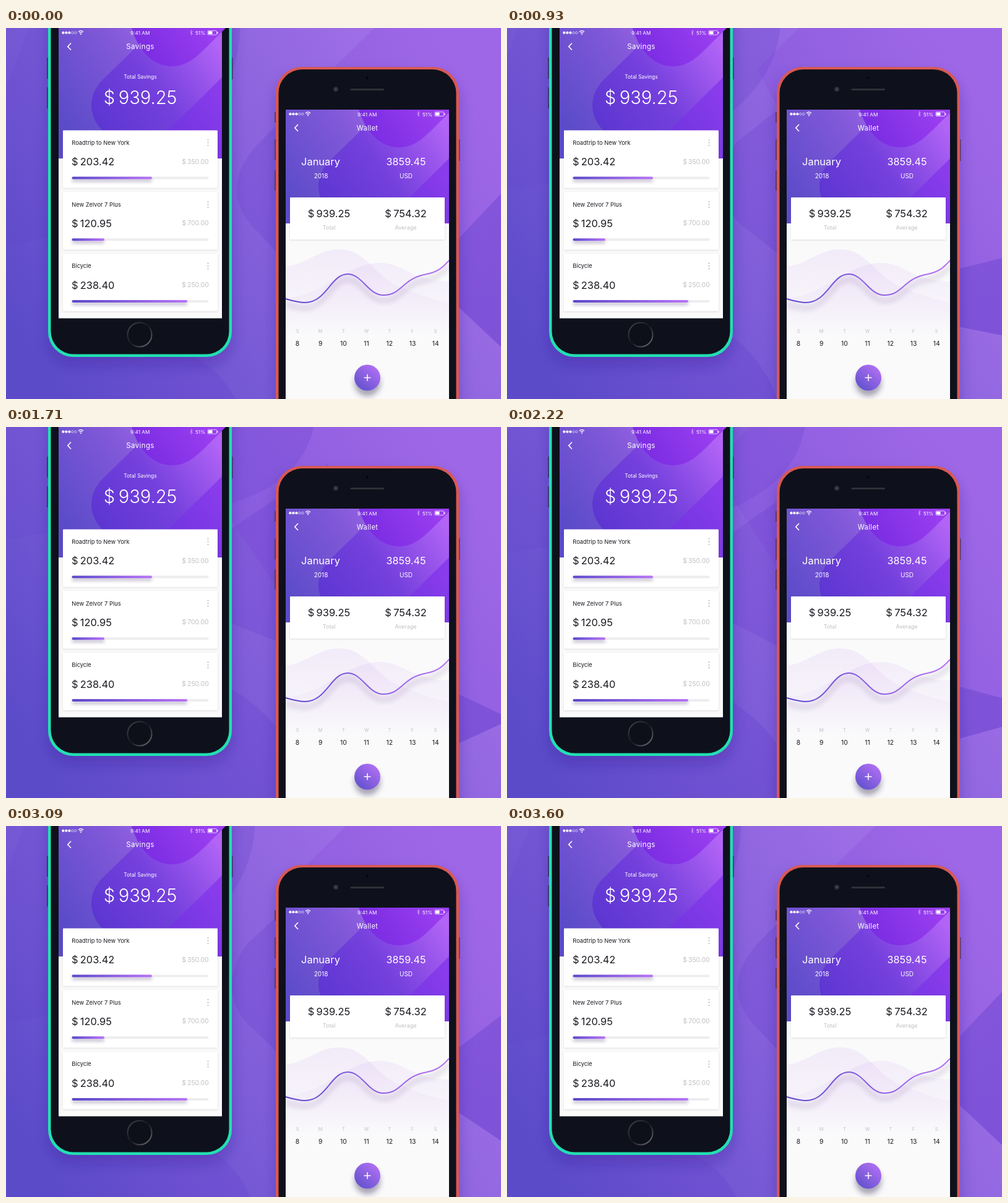
Recreate the animation shown at these times as an HTML page. Size 800 px wide and 600 px high, loop 3.63 s.

```html
<!DOCTYPE html>
<html lang="en">
<head>
<meta charset="utf-8">
<title>Savings and wallet</title>
<style>
  html, body { margin: 0; width: 100%; height: 100%; overflow: hidden; }
  svg { display: block; width: 800px; height: 600px; }
  text { font-family: Inter, sans-serif; }
  .money { word-spacing: -.08em; }
</style>
</head>
<body>
<svg viewBox="0 0 800 600">
  <defs>
    <linearGradient id="sky" gradientUnits="userSpaceOnUse" x1="60" y1="560" x2="760" y2="120">
      <stop stop-color="#5b4bc9"/><stop offset=".5" stop-color="#8560db"/><stop offset="1" stop-color="#a672e9"/>
    </linearGradient>
    <linearGradient id="soft" gradientUnits="userSpaceOnUse" x1="0" y1="0" x2="500" y2="0">
      <stop stop-color="#5638c4" stop-opacity=".1"/><stop offset="1" stop-color="#5638c4" stop-opacity=".22"/>
    </linearGradient>
    <linearGradient id="shade" gradientUnits="userSpaceOnUse" x1="0" y1="0" x2="800" y2="0">
      <stop stop-color="#5a3ac8" stop-opacity="0"/><stop offset="1" stop-color="#5a30c8" stop-opacity=".42"/>
    </linearGradient>
    <linearGradient id="head" gradientUnits="userSpaceOnUse" x1="95" y1="165" x2="330" y2="0">
      <stop stop-color="#5a4bc8"/><stop offset=".5" stop-color="#8058d8"/><stop offset="1" stop-color="#bb74f6"/>
    </linearGradient>
    <linearGradient id="blob" gradientUnits="userSpaceOnUse" x1="150" y1="175" x2="345" y2="30">
      <stop stop-color="#5a35d0"/><stop offset=".5" stop-color="#7540dd"/><stop offset="1" stop-color="#b264f6"/>
    </linearGradient>
    <linearGradient id="fold" gradientUnits="userSpaceOnUse" x1="216" y1="211" x2="349" y2="110">
      <stop stop-color="#6230d8"/><stop offset="1" stop-color="#8a3cec"/>
    </linearGradient>
    <linearGradient id="drop" gradientUnits="userSpaceOnUse" x1="230" y1="60" x2="325" y2="0">
      <stop stop-color="#7a2ce2"/><stop offset="1" stop-color="#9a3ef0"/>
    </linearGradient>
    <linearGradient id="bar"><stop stop-color="#5b48cb"/><stop offset="1" stop-color="#b873f6"/></linearGradient>
    <linearGradient id="fab" x1="0.1" y1="1" x2=".9" y2="0">
      <stop stop-color="#5b4fca"/><stop offset="1" stop-color="#b972f7"/>
    </linearGradient>
    <linearGradient id="wave" gradientUnits="userSpaceOnUse" x1="0" y1="358" x2="0" y2="500">
      <stop stop-color="#b57ae8" stop-opacity=".12"/><stop offset="1" stop-color="#b57ae8" stop-opacity="0"/>
    </linearGradient>
    <linearGradient id="ring" x1="0" y1="0" x2="1" y2="1">
      <stop stop-color="#4a4c54"/><stop offset=".5" stop-color="#15171f"/><stop offset="1" stop-color="#77787d"/>
    </linearGradient>
    <filter id="phoneShadow" x="-20%" y="-20%" width="140%" height="140%">
      <feDropShadow dx="0" dy="13" stdDeviation="12" flood-color="#2a1878" flood-opacity=".24"/>
    </filter>
    <filter id="cardShadow" x="-10%" y="-20%" width="120%" height="150%">
      <feDropShadow dx="0" dy="1" stdDeviation="1.6" flood-color="#223" flood-opacity=".14"/>
    </filter>
    <filter id="glow" filterUnits="userSpaceOnUse" x="80" y="220" width="660" height="380">
      <feDropShadow dx="0" dy="4" stdDeviation="2.5" flood-color="#3a2a60" flood-opacity=".35"/>
    </filter>
    <filter id="deepGlow" filterUnits="userSpaceOnUse" x="430" y="340" width="320" height="260">
      <feDropShadow dx="0" dy="9" stdDeviation="4" flood-color="#302848" flood-opacity=".4"/>
    </filter>
    <clipPath id="headClip"><path d="M85 1H349V185H85z"/></clipPath>
    <clipPath id="chartClip"><path d="M452 316H716V600H452z"/></clipPath>

    <g id="header">
      <path d="M85 0H349V211H85z" fill="url(#head)"/>
      <path d="M242 0L156 84C132 108 132 142 156 166L201 211H349V0z" fill="url(#blob)"/>
      <path d="M349 80L216 211H349z" fill="url(#fold)"/>
      <path d="M203 0C215 40 240 62 268 62C295 62 310 45 335 20L355 0z" fill="url(#drop)"/>
    </g>
    <g id="status" fill="#fff">
      <g id="dots"></g>
      <g fill="none" stroke="#fff">
        <path d="M117 6.2Q121 2.6 125 6.2M118.7 8.1Q121 6 123.3 8.1" stroke-width="1.2"/>
        <path d="M297.5 5.5L301.5 9.5L299.5 11.5V3.5L301.5 5.5L297.5 9.5" stroke-width=".6" opacity=".7"/>
        <rect x="326" y="4.3" width="14.5" height="6.8" rx="1.3" stroke-width=".7"/>
        <path d="M105 24.5L99.8 30L105 35.5" stroke-width="1.6"/>
      </g>
      <circle cx="121" cy="10" r="1"/>
      <path d="M327 5.3H333.5V10.1H327zM341.3 6.2H342.5V9.2H341.3z"/>
      <text x="216.7" y="11" font-size="8.2" text-anchor="middle">9:41 AM</text>
      <text x="306" y="11" font-size="8.2">51%</text>
    </g>
  </defs>

  <path d="M0 0H800V600H0z" fill="url(#sky)"/>
  <path class="drift" fill="url(#soft)"/>
  <path class="drift" fill="#7c3fdc" fill-opacity=".2"/>
  <path class="drift" fill="url(#shade)"/>
  <path class="drift" fill="url(#shade)"/>

  <g id="savings">
    <path d="M66 48h3v34h-3zM66 96h3v34h-3zM364 48h2.500v35h-2.500z" fill="#4a3a70"/>
    <rect x="68" y="-60" width="297" height="592" rx="41" fill="#20dfb2" filter="url(#phoneShadow)"/>
    <rect x="72.500" y="-60" width="288" height="587.500" rx="37" fill="#0e111b"/>
    <circle cx="216" cy="496" r="19.5" fill="#0d1019" stroke="url(#ring)" stroke-width="2"/>
    <path d="M85 0H349V469.500H85z" fill="#fafafb"/>
    <use href="#header"/><use href="#status"/>
  </g>

  <g id="wallet">
    <path d="M434 136h3v17h-3zM434 180h3v34h-3zM434 230h3v33h-3zM731 180h2.500v35h-2.500z" fill="#6a3f68"/>
    <rect x="436" y="63" width="296" height="620" rx="42" fill="#d85852" filter="url(#phoneShadow)"/>
    <rect x="440.5" y="67" width="287" height="620" rx="38" fill="#0e111b"/>
    <circle cx="533" cy="99" r="4" fill="#2c2e37"/><circle cx="533" cy="99" r="1.8" fill="#454852"/>
    <circle cx="584" cy="81" r="2.2" fill="#060810"/>
    <path d="M558 99.5H609.500" stroke="#2f3139" stroke-width="3" stroke-linecap="round"/>
    <path d="M452 132H716V600H452z" fill="#fafafb"/>
    <g transform="translate(367 131)" clip-path="url(#headClip)"><use href="#header"/></g>
    <use href="#status" x="367" y="131.5"/>
    <g clip-path="url(#chartClip)">
      <path d="M452 386C485 382 505 358 538 358C585 358 595 404 640 420C670 432 690 440 716 444V500H452z" fill="url(#wave)"/>
      <path d="M452 436C510 436 550 380 604 380C645 380 650 408 716 410V500H452z" fill="url(#wave)"/>
      <path d="M452 438C463 441 472 444 483 444C518 444 525 398 552 398C576 398 585 432 610 432C640 432 640 405 680 398C699 394 706 387 716 376"
        fill="none" stroke="url(#bar)" stroke-width="2" filter="url(#deepGlow)"/>
    </g>
    <rect x="459" y="274" width="250" height="68" rx="1" fill="#fff" filter="url(#cardShadow)"/>
    <circle cx="584" cy="565.500" r="21" fill="url(#fab)" filter="url(#deepGlow)"/>
    <path d="M578.500 565.500H589.500M584 560V571" stroke="#fff" stroke-width="1.5"/>
  </g>
</svg>
<script>
const savings = document.getElementById('savings');
const wallet = document.getElementById('wallet');
const add = (parent, markup) => parent.insertAdjacentHTML('beforeend', markup);

function label(parent, x, y, size, text, fill = '#fff', anchor = 'middle', extra = '') {
  const kind = text[0] === '$' ? 'class="money"' : '';
  add(parent, `<text x="${x}" y="${y}" font-size="${size}" fill="${fill}" text-anchor="${anchor}" ${kind} ${extra}>${text}</text>`);
}

const dots = document.getElementById('dots');
for (let i = 0; i < 5; i++) {
  const look = i < 3 ? 'r="2.1"' : 'r="1.8" fill="none" stroke="#fff" stroke-width=".6"';
  add(dots, `<circle cx="${92.4 + i * 5}" cy="7.700" ${look}/>`);
}

const ink = '#1b1b22', pale = '#c0c0c5';

label(savings, 217, 34, 11.5, 'Savings', '#fff', 'middle', 'letter-spacing=".4"');
label(savings, 217, 82, 8.5, 'Total Savings');
label(savings, 217, 123, 29.2, '$ 939.25', '#fff', 'middle', 'font-weight="300" letter-spacing="-.1"');

const goals = [
  ['Roadtrip to New York', '$ 203.42', '$ 350.00', 236],
  ['New Zelvor 7 Plus', '$ 120.95', '$ 700.00', 159],
  ['Bicycle', '$ 238.40', '$ 250.00', 293],
];
goals.forEach(([name, saved, goal, end], i) => {
  const y = 165.5 + i * 99.8;
  add(savings, `<rect x="92" y="${y}" width="250" height="93" rx="1" fill="#fff" filter="url(#cardShadow)"/>`);
  for (let d = 0; d < 3; d++) {
    add(savings, `<circle cx="326.500" cy="${y + 15.5 + d * 4.5}" r="1.1" fill="#bcbcc2"/>`);
  }
  add(savings, `<rect x="106.500" y="${y + 75}" width="221" height="4" rx="2" fill="#ededf0"/>
    <rect x="106.500" y="${y + 75}" width="${end - 106.5}" height="4" rx="2" fill="url(#bar)" filter="url(#glow)"/>`);
  label(savings, 106.3, y + 23.2, 9.3, name, ink, 'start');
  label(savings, 106, y + 56.8, 16.4, saved, ink, 'start');
  label(savings, 327.7, y + 54, 10.4, goal, pale, 'end');
});

label(wallet, 584, 165.5, 11.2, 'Wallet', '#fff', 'middle', 'letter-spacing=".4"');
label(wallet, 508.5, 221.5, 16.4, 'January');
label(wallet, 646.5, 221.5, 16.2, '3859.45');
label(wallet, 509, 243, 10, '2018');
label(wallet, 646.5, 243, 10, 'USD');
label(wallet, 522, 305.5, 16.5, '$ 939.25', ink);
label(wallet, 646, 305.5, 16.5, '$ 754.32', ink);
label(wallet, 522, 325.5, 9, 'Total', pale);
label(wallet, 646, 325.5, 9, 'Average', pale);
[...'SMTWTFS'].forEach((day, i) => {
  const x = 471 + i * 37.2;
  label(wallet, x, 493, 7.4, day, pale);
  label(wallet, x, 513.7, 10.4, String(8 + i), ink);
});

// Each background shape has two poses with the same path commands.
const poses = [
  ['M60 -60L-40 200L-20 355C60 345 160 320 250 230C330 150 400 70 372 -60Z',
   'M20 -60L-20 60L-20 186C60 165 200 160 365 122C450 98 505 50 505 -60Z'],
  ['M636 -40L520 74L660 430L732 340L815 252L815 -40Z',
   'M400 -40L300 60L520 380L732 433L815 473L815 -40Z'],
  ['M520 74L405 190C362 238 362 285 405 328L520 450L660 430L732 340L815 252L815 530L732 452L600 300Z',
   'M520 60L340 180C320 220 330 305 365 318L437 346L600 400L732 433L815 473L815 473L732 512L600 300Z'],
  ['M-20 400L150 480C290 505 378 560 378 640L-20 640Z',
   'M-20 400L300 400C430 425 500 560 500 640L-20 640Z'],
];
const blend = ([from, to], p) => {
  const goal = to.match(/-?\d+/g);
  let i = 0;
  return from.replace(/-?\d+/g, v => (+v + (goal[i++] - v) * p).toFixed(2));
};

const shapes = document.querySelectorAll('.drift');
const LOOP = 3630, HALF = 1800;

function draw(now) {
  const u = Math.max(0, 1 - Math.abs((now % LOOP) / HALF - 1));
  const p = u * u * (3 - 2 * u);
  shapes.forEach((shape, i) => shape.setAttribute('d', blend(poses[i], p)));
  requestAnimationFrame(() => draw(performance.now()));
}
draw(0);
</script>
</body>
</html>
```
